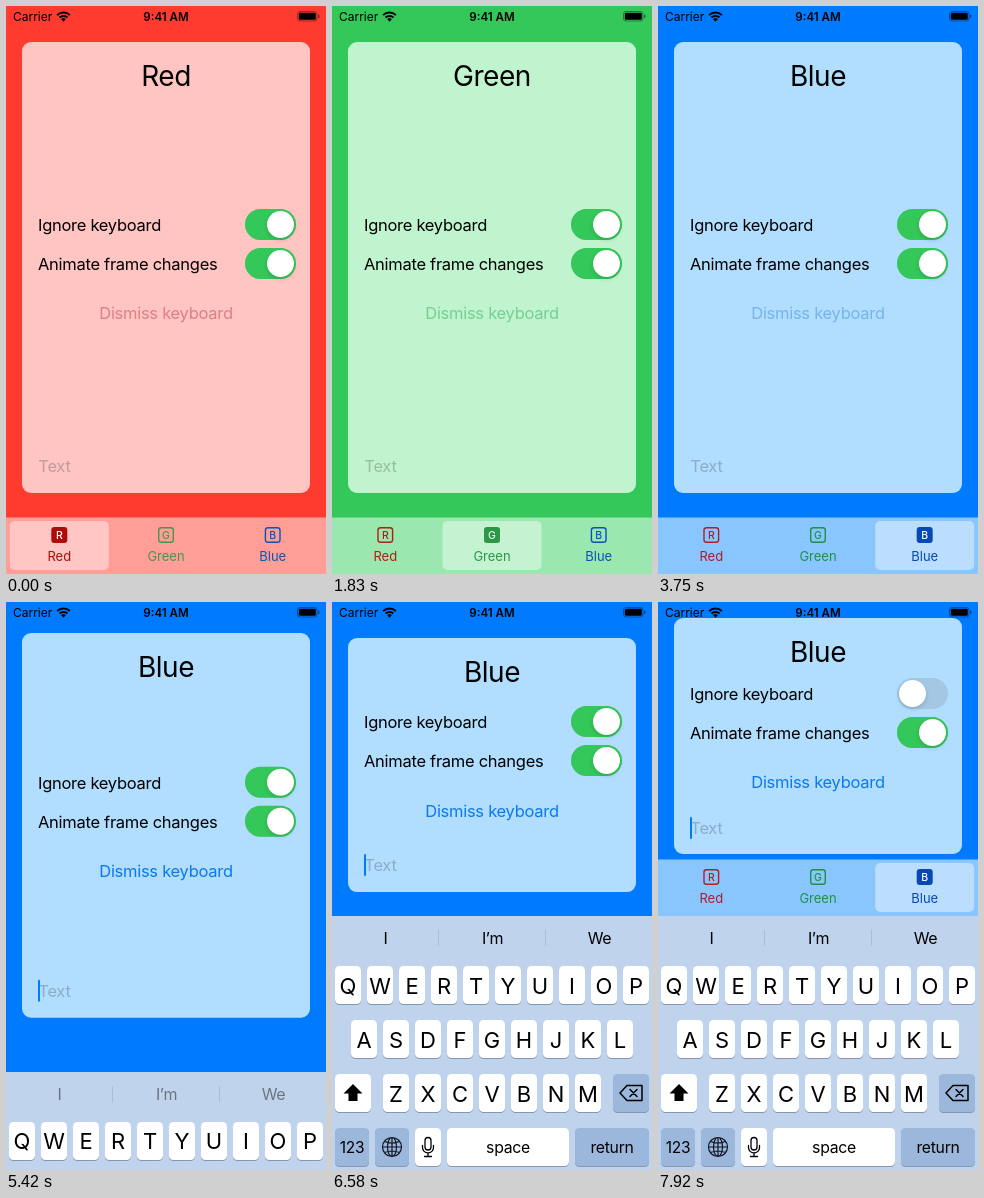
An HTML page with a canvas that plays this animation: 320 by 568 pixels, repeating every 8000 ms.

```html
<!DOCTYPE html>
<html lang="en">
<head>
<meta charset="utf-8">
<title>Keyboard avoidance</title>
<style>
  html, body { margin: 0; width: 100%; height: 100%; overflow: hidden; }
  canvas { display: block; width: 320px; height: 568px; }
</style>
</head>
<body>
<canvas id="stage"></canvas>
<script>
const W = 320, H = 568, LOOP = 8000;
const canvas = document.getElementById('stage');
const ctx = canvas.getContext('2d');
const dpr = window.devicePixelRatio || 1;
canvas.width = W * dpr;
canvas.height = H * dpr;

const BLUE = '#007aff', GREEN = '#34c759';
const TABS = ['Red', 'Green', 'Blue'];
const THEMES = [
  { bg: '#ff3b30', card: '#ffc5c2', bar: '#ff9d97', faded: '#dd8084', tints: ['#ad0c08', '#45974b', '#0b55b5'] },
  { bg: '#34c759', card: '#c0f4cf', bar: '#9ae8b0', faded: '#76cf90', tints: ['#ab2112', '#178a34', '#0a50bd'] },
  { bg: '#007aff', card: '#b1deff', bar: '#89c5ff', faded: '#76b4ea', tints: ['#a82226', '#1f9145', '#0848b4'] }
];

// top, bottom, title, first switch, second switch, button, text field
const FULL = [36, 487, 70, 219, 258, 307, 460];
const SHORT = [36, 290, 70, 120, 159, 209, 263];
const TIGHT = [16, 252, 50, 92, 131, 180, 226];

const TIME = { green: 1660, blue: 3410, focus: 4950, keyboard: 5290, toggle: 6900, lift: 6930 };
const PRESSES = [null, [1490, TIME.green], [3240, TIME.blue]];

const clamp = v => Math.max(0, Math.min(1, v));
const mix = (a, b, p) => a + (b - a) * p;
const ramp = (t, start, length) => clamp((t - start) / length);
const ease = p => p * p * (3 - 2 * p);

function spring(t, start, speed) {
  const x = Math.max(0, t - start) / 1000 * speed;
  return 1 - (1 + x) * Math.exp(-x);
}

function box(x, y, w, h, r, fill) {
  ctx.beginPath();
  ctx.roundRect(x, y, w, h, r);
  ctx.fillStyle = fill;
  ctx.fill();
}

// y is the middle of the capital letters
function label(str, x, y, size, color, { align = 'center', weight = 400, gap = 0 } = {}) {
  ctx.font = `${weight} ${size}px Inter, Roboto, sans-serif`;
  ctx.letterSpacing = gap + 'px';
  ctx.textAlign = align;
  ctx.fillStyle = color;
  ctx.fillText(str, x, y + size * 0.364);
}

function stroke(width, color, draw) {
  ctx.beginPath();
  draw();
  ctx.lineWidth = width;
  ctx.strokeStyle = color;
  ctx.stroke();
}

function poly(points) {
  ctx.beginPath();
  points.forEach(([x, y]) => ctx.lineTo(x, y));
  ctx.closePath();
}

function statusBar() {
  label('Carrier', 7, 11, 12, '#000', { align: 'left' });
  label('9:41 AM', 160, 11, 11.6, '#000', { weight: 600 });
  const from = -Math.PI * 0.75, to = -Math.PI * 0.25;
  for (const r of [9, 5.6]) stroke(2, '#000', () => ctx.arc(57.5, 15.5, r, from, to));
  ctx.beginPath();
  ctx.moveTo(57.5, 15.8);
  ctx.arc(57.5, 15.5, 3.3, from, to);
  ctx.fillStyle = '#000';
  ctx.fill();
  stroke(1, 'rgba(0,0,0,.38)', () => ctx.roundRect(291.5, 5.5, 19.5, 9.5, 2.5));
  box(292.8, 6.8, 17, 7, 1.3, '#000');
  box(312, 8.5, 1.4, 3.6, 0.7, 'rgba(0,0,0,.45)');
}

function toggle(y, on) {
  const top = y - 16;
  box(239, top, 51, 31, 15.5, 'rgba(120,120,128,.22)');
  ctx.globalAlpha = on;
  box(239, top, 51, 31, 15.5, GREEN);
  ctx.globalAlpha = 1;
  ctx.save();
  ctx.shadowColor = 'rgba(0,0,0,.15)';
  ctx.shadowBlur = 4 * dpr;
  ctx.shadowOffsetY = 2 * dpr;
  box(mix(241, 261, on), top + 2, 27, 27, 13.5, '#fff');
  ctx.restore();
}

function card(index, pose, t) {
  const [top, bottom, title, first, second, button, field] = pose;
  const theme = THEMES[index];
  const body = { align: 'left', gap: -0.28 };
  box(16, top, 288, bottom - top, 9, theme.card);
  label(TABS[index], 160, title, 28, '#000', { gap: -0.45 });
  label('Ignore keyboard', 32, first, 16.5, '#000', body);
  toggle(first, 1 - ease(ramp(t, TIME.toggle, 250)));
  label('Animate frame changes', 32, second, 16.5, '#000', body);
  toggle(second, 1);
  const focused = t >= TIME.focus;
  label('Dismiss keyboard', 160, button, 16.5, focused ? '#0b79ee' : theme.faded, { gap: -0.28 });
  label('Text', 32.3, field, 16.5, 'rgba(60,60,67,.3)', body);
  if (focused) box(32, field - 11, 2, 22, 1, BLUE);
}

function tabBar(index, y, t) {
  box(0, y, W, H - 511, 0, THEMES[index].bar);
  TABS.forEach((name, i) => {
    const x = 53.3 + i * 106.7;
    const color = THEMES[index].tints[i];
    const active = i === index;
    if (active) box(x - 49.5, y + 3.5, 99, 49, 5, 'rgba(255,255,255,.42)');
    const press = PRESSES[i];
    if (press && t >= press[0]) {
      ctx.globalAlpha = t < press[1] ? 0.2 : mix(0.2, 1, ramp(t, press[1], 200));
    }
    if (active) box(x - 8, y + 9.5, 16, 16, 3, color);
    else stroke(1.4, color, () => ctx.roundRect(x - 7.3, y + 10.2, 14.6, 14.6, 2.6));
    label(name[0], x, y + 17.5, 10.5, active ? '#fff' : color, { weight: 500 });
    label(name, x, y + 38.5, 13, color);
    ctx.globalAlpha = 1;
  });
}

function key(x, y, w, fill = '#fff') {
  box(x, y + 1, w, 38, 4.5, '#8797b0');
  box(x, y, w, 38, 4.5, fill);
}

function keyIcons() {
  // shift
  poly([[21, 482], [30.5, 491.5], [25.5, 491.5], [25.5, 499], [16.5, 499], [16.5, 491.5], [11.5, 491.5]]);
  ctx.fillStyle = '#000';
  ctx.fill();
  ctx.lineJoin = ctx.lineCap = 'round';
  // delete
  poly([[288, 491], [295, 483.5], [310, 483.5], [310, 498.5], [295, 498.5]]);
  ctx.lineWidth = 1.5;
  ctx.strokeStyle = '#000';
  ctx.stroke();
  stroke(1.5, '#000', () => {
    ctx.moveTo(298, 487.5); ctx.lineTo(305, 494.5);
    ctx.moveTo(305, 487.5); ctx.lineTo(298, 494.5);
  });
  // globe
  stroke(1.2, '#10151f', () => {
    ctx.arc(60, 545, 9.5, 0, 7);
    ctx.moveTo(64.5, 545);
    ctx.ellipse(60, 545, 4.5, 9.5, 0, 0, 7);
    ctx.moveTo(60, 535.5); ctx.lineTo(60, 554.5);
    ctx.moveTo(50.5, 545); ctx.lineTo(69.5, 545);
    ctx.moveTo(52.5, 539.5); ctx.quadraticCurveTo(60, 542.5, 67.5, 539.5);
    ctx.moveTo(52.5, 550.5); ctx.quadraticCurveTo(60, 547.5, 67.5, 550.5);
  });
  // microphone
  stroke(1.3, '#000', () => {
    ctx.roundRect(93, 535.5, 6, 12.5, 3);
    ctx.moveTo(90.5, 543.5); ctx.lineTo(90.5, 545.5);
    ctx.arc(96, 545.5, 5.5, Math.PI, 0, true);
    ctx.lineTo(101.5, 543.5);
    ctx.moveTo(96, 551); ctx.lineTo(96, 554.5);
    ctx.moveTo(92.5, 554.5); ctx.lineTo(99.5, 554.5);
  });
  ctx.lineJoin = 'miter';
  ctx.lineCap = 'butt';
}

function keyboard(drop, t) {
  const grey = '#9cb7dc';
  ctx.save();
  ctx.translate(0, drop);
  box(0, 314, W, 254, 0, '#c0d3ed');
  ctx.globalAlpha = mix(0.45, 1, ramp(t, 5420, 250));
  ['I', 'I’m', 'We'].forEach((word, i) => label(word, 53.5 + i * 107, 336, 16, '#000', { gap: -0.3 }));
  ctx.globalAlpha = 1;
  for (const x of [106, 213]) box(x, 328, 1, 16, 0, '#a9bddb');

  ['QWERTYUIOP', 'ASDFGHJKL', 'ZXCVBNM'].forEach((row, r) => {
    const first = 160 - (row.length - 1) * 16;
    [...row].forEach((letter, i) => {
      const x = first + i * 32;
      key(x - 13, 364 + r * 54, 26);
      label(letter, x, 383.5 + r * 54, 22, '#000');
    });
  });
  key(3, 472, 36);
  key(281, 472, 36, grey);
  key(3, 526, 34, grey);
  key(43, 526, 34, grey);
  key(83, 526, 26);
  key(115, 526, 122);
  key(243, 526, 74, grey);
  label('123', 20, 545, 15.5, '#000', { gap: -0.2 });
  label('space', 176, 545, 15.8, '#000', { gap: -0.3 });
  label('return', 280, 545, 15.8, '#000', { gap: -0.3 });
  keyIcons();
  ctx.restore();
}

function render(t) {
  const index = t < TIME.green ? 0 : t < TIME.blue ? 1 : 2;
  const rise = spring(t, TIME.keyboard, 10.2);
  const shrink = spring(t, TIME.keyboard, 9.15);
  const lift = spring(t, TIME.lift, 15);
  const pose = FULL.map((v, i) => {
    const y = mix(v, SHORT[i], shrink) - 100 * (rise - shrink);
    return mix(y, TIGHT[i], lift);
  });

  ctx.setTransform(dpr, 0, 0, dpr, 0, 0);
  box(0, 0, W, H, 0, THEMES[index].bg);
  card(index, pose, t);
  tabBar(index, mix(511.5, 257.5, lift), t);
  if (rise > 0) keyboard(254 * (1 - rise), t);
  statusBar();
}

const start = performance.now();
function frame() {
  render((performance.now() - start) % LOOP);
  requestAnimationFrame(frame);
}
frame();
</script>
</body>
</html>
```
